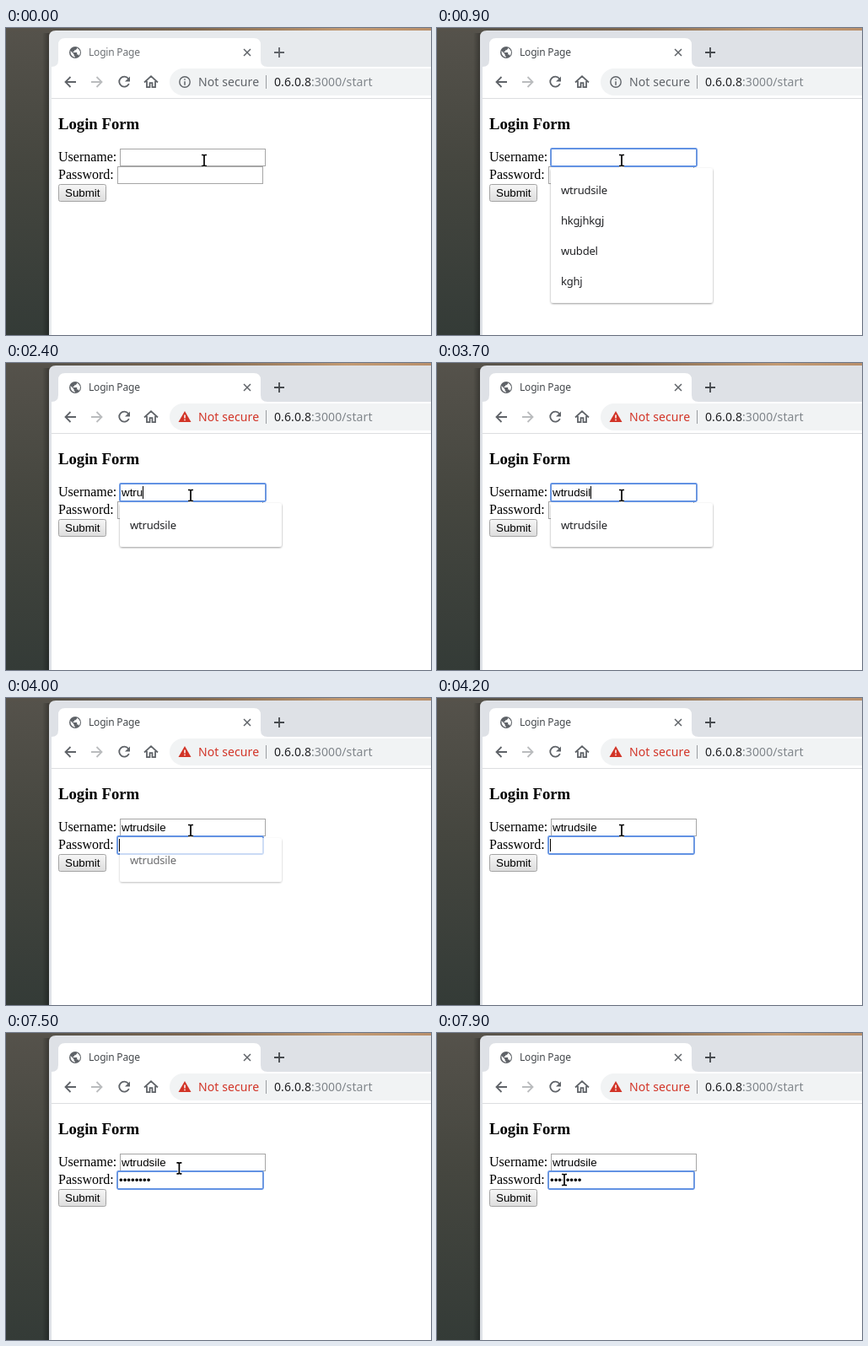
These frames come from a looping animation (504x364 px, 8000 ms). An HTML page:

```html
<!DOCTYPE html>
<html lang="en">
<head>
<meta charset="utf-8">
<title>Login Page</title>
<style>
  html, body { margin: 0; width: 504px; height: 364px; overflow: hidden; background: #fff; }
  svg { display: block; }
  text { white-space: pre; }
  .ui { font-family: "Noto Sans", sans-serif; font-size: 14px; fill: #5f6368; }
  .page { font-family: "Liberation Serif", serif; font-size: 16px; }
  .field { font-family: "Liberation Sans", sans-serif; font-size: 13.333px; }
  .icon { fill: none; stroke: #5f6368; stroke-width: 1.8; }
  .input { fill: #fff; stroke: #a6a6a6; }
</style>
</head>
<body>
<svg width="504" height="364" viewBox="0 0 504 364">
  <defs>
    <linearGradient id="wall" x2="0" y2="1">
      <stop offset="0" stop-color="#55524b"/>
      <stop offset=".45" stop-color="#45463f"/>
      <stop offset="1" stop-color="#343b37"/>
    </linearGradient>
    <linearGradient id="sky">
      <stop offset=".1" stop-color="#56524a"/>
      <stop offset=".45" stop-color="#80684f"/>
      <stop offset=".8" stop-color="#c39a72"/>
      <stop offset="1" stop-color="#b98f6a"/>
    </linearGradient>
    <linearGradient id="edge">
      <stop offset="0" stop-opacity="0"/>
      <stop offset="1" stop-opacity=".3"/>
    </linearGradient>
    <linearGradient id="button" x2="0" y2="1">
      <stop offset="0" stop-color="#f6f6f6"/>
      <stop offset="1" stop-color="#dddddd"/>
    </linearGradient>
    <filter id="shadow" x="-10%" y="-10%" width="120%" height="125%">
      <feDropShadow dx="0" dy="1" stdDeviation="1.3" flood-opacity=".4"/>
    </filter>
  </defs>

  <!-- Desktop and window frame -->
  <rect width="504" height="364" fill="url(#wall)"/>
  <rect width="504" height="4" fill="url(#sky)"/>
  <rect x="43" y="6" width="8" height="358" fill="url(#edge)"/>
  <path id="frame" d="M51 364V11Q51 3 59 3H504V364Z"/>
  <path d="M54 364V46Q62 46 62 38V20Q62 12 70 12H294Q302 12 302 20V38Q302 46 310 46H504V364Z" fill="#fff"/>

  <!-- Tab -->
  <circle cx="82" cy="29" r="7" fill="#5f6368"/>
  <path d="M76.5 27l4 4v1.5l1.5 1.5v.8Q76 34 76.5 27M84 23.6v1.2l-1.6 1.4h-1.3v1.6h-1.5v1.3h4.6v2.4h1.6l1 1.6Q90 27 84 23.6" fill="#fff"/>
  <text id="title" class="ui" x="98" y="33" style="font-size:12px;letter-spacing:-.2px">Login Page</text>
  <path class="icon" d="M282 25l8 8m0-8l-8 8" style="stroke-width:1.5"/>
  <path id="plus" class="icon" d="M318 29h12m-6-6v12"/>

  <!-- Toolbar -->
  <path class="icon" d="M83 64H70.5m6-6l-6 6l6 6"/>
  <path class="icon" d="M101 64h12.500m-6-6l6 6l-6 6" style="stroke:#babcbe"/>
  <path class="icon" d="M145 60A6 6 0 1 0 145.800 66"/>
  <path d="M147 57.500v6h-6z" fill="#5f6368"/>
  <path class="icon" d="M164 64.500l8-7.300l8 7.300M167 63v7.200h3.500v-5h3v5h3.500V63"/>
  <rect x="194" y="48" width="330" height="32" rx="16" fill="#f1f3f4"/>
  <g id="info">
    <circle class="icon" cx="212" cy="64" r="6.200" style="stroke-width:1.4"/>
    <path class="icon" d="M212 60.300v1.500m0 1.500v4.500" style="stroke-width:1.5"/>
  </g>
  <g id="warn">
    <path d="M212 57l7.500 13h-15z" fill="#d23427"/>
    <path d="M212 61.500v4m0 1.200v1.500" stroke="#fff" stroke-width="1.500"/>
  </g>
  <text id="secure" class="ui" x="228" y="69" style="letter-spacing:.1px">Not secure</text>
  <path d="M308.500 56v16" stroke="#9a9da1"/>
  <text class="ui" x="318" y="69" style="letter-spacing:.1px;fill:#80868b"><tspan fill="#202124">0.6.0.8</tspan>:3000/start</text>
  <path d="M54 83.500H504" stroke="#dcdee0"/>

  <!-- Page -->
  <text class="page" x="62" y="120" style="font-size:18.72px;font-weight:bold">Login Form</text>
  <text class="page" x="62" y="158">Username:</text>
  <text class="page" x="62" y="179">Password:</text>
  <rect class="input" x="135.500" y="143.500" width="172" height="20"/>
  <rect class="input" x="132.500" y="164.500" width="172" height="20"/>
  <rect id="ring" width="173" height="21" rx="1.500" fill="none" stroke="#6292e3" stroke-width="1.800"/>
  <text id="user" class="field" x="137" y="158"></text>
  <text id="pass" class="field" x="134" y="179"></text>
  <rect id="caret" width="1" height="15"/>
  <rect x="62.500" y="185.500" width="56" height="20" rx="2" fill="url(#button)" stroke="#a3a3a3"/>
  <text class="field" x="70" y="200">Submit</text>

  <g id="list">
    <rect id="panel" x="135" y="166" width="192" rx="3" fill="#fff" filter="url(#shadow)"/>
    <g id="items"></g>
  </g>

  <g id="mouse" fill="none">
    <path id="beam" d="M-3 -6.500h2L0 -5.500L1 -6.500h2M0 -5.500V5.500M-3 6.500h2L0 5.500L1 6.500h2" stroke="#fff" stroke-width="3.500"/>
    <use href="#beam" style="stroke:#000"/>
    <path d="M-3 -6.500h2L0 -5.500L1 -6.500h2M0 -5.500V5.500M-3 6.500h2L0 5.500L1 6.500h2" stroke="#000" stroke-width="1.700"/>
  </g>
</svg>
<script>
const $ = id => document.getElementById(id);
const LOOP = 8000;
const NAMES = ["wtrudsile", "hkgjhkgj", "wubdel", "kghj"];
const USER_KEYS = [1300, 1800, 2200, 2400, 3100, 3100, 3400, 3700, 3900];
const PASS_KEYS = [4900, 5200, 5400, 5700, 6100, 6400, 6700, 7000];

const set = (id, attrs) => {
  for (const key in attrs) $(id).setAttribute(key, attrs[key]);
};
const show = (id, on) => set(id, { visibility: on ? "visible" : "hidden" });
const typed = (keys, t) => keys.filter(k => k <= t).length;
const within = (t, from, to) => t >= from && t < to;
// Progress in 100 ms steps, the first one already at the start time
const steps = (t, start, count) =>
  Math.max(0, Math.min(1, (Math.floor((t - start) / 100) + 1) / count));

function drawList(t, text) {
  const names = NAMES.filter(n => n.startsWith(text));
  show("list", within(t, 300, 4200));
  set("list", { opacity: 1 - steps(t, 4000, 3) });
  set("panel", { height: 16 + 36 * names.length });
  $("items").innerHTML = names.map((n, i) =>
    `<text class="ui" x="147" y="${197 + 36 * i}" style="font-size:13px;letter-spacing:-.2px;fill:#202124">${n}</text>`
  ).join("");
}

function drawFields(t, text) {
  const inPass = t >= 4000;
  const field = inPass ? "pass" : "user";
  $("user").textContent = text;
  $("pass").textContent = "•".repeat(typed(PASS_KEYS, t));
  show("ring", t >= 300);
  set("ring", inPass ? { x: 132, y: 164 } : { x: 135, y: 143 });

  const width = $(field).textContent ? $(field).getComputedTextLength() : 0;
  set("caret", { x: Math.round((inPass ? 134 : 137) + width), y: inPass ? 167 : 146 });
  show("caret", t >= 300 && !within(t, 900, 1300) && !within(t, 4800, 4900) && t < 7500);
}

function draw(t) {
  const active = t >= 300, warned = t >= 1300;
  const text = NAMES[0].slice(0, typed(USER_KEYS, t));
  $("frame").style.fill = active ? "#dee1e6" : "#e7eaed";
  $("title").style.fill = active ? "#45494d" : "#6d7175";
  $("plus").style.stroke = active ? "#45494d" : "#5f6368";
  $("secure").style.fill = warned ? "#d23427" : "#5f6368";
  show("info", !warned);
  show("warn", warned);
  drawFields(t, text);
  drawList(t, text);

  const left = steps(t, 600, 2), down = steps(t, 7500, 5);
  set("mouse", { transform: `translate(${235 - 16 * left - 68 * down} ${157 + 17 * down})` });
}

function tick() {
  draw(performance.now() % LOOP);
  requestAnimationFrame(tick);
}
tick();
</script>
</body>
</html>
```
